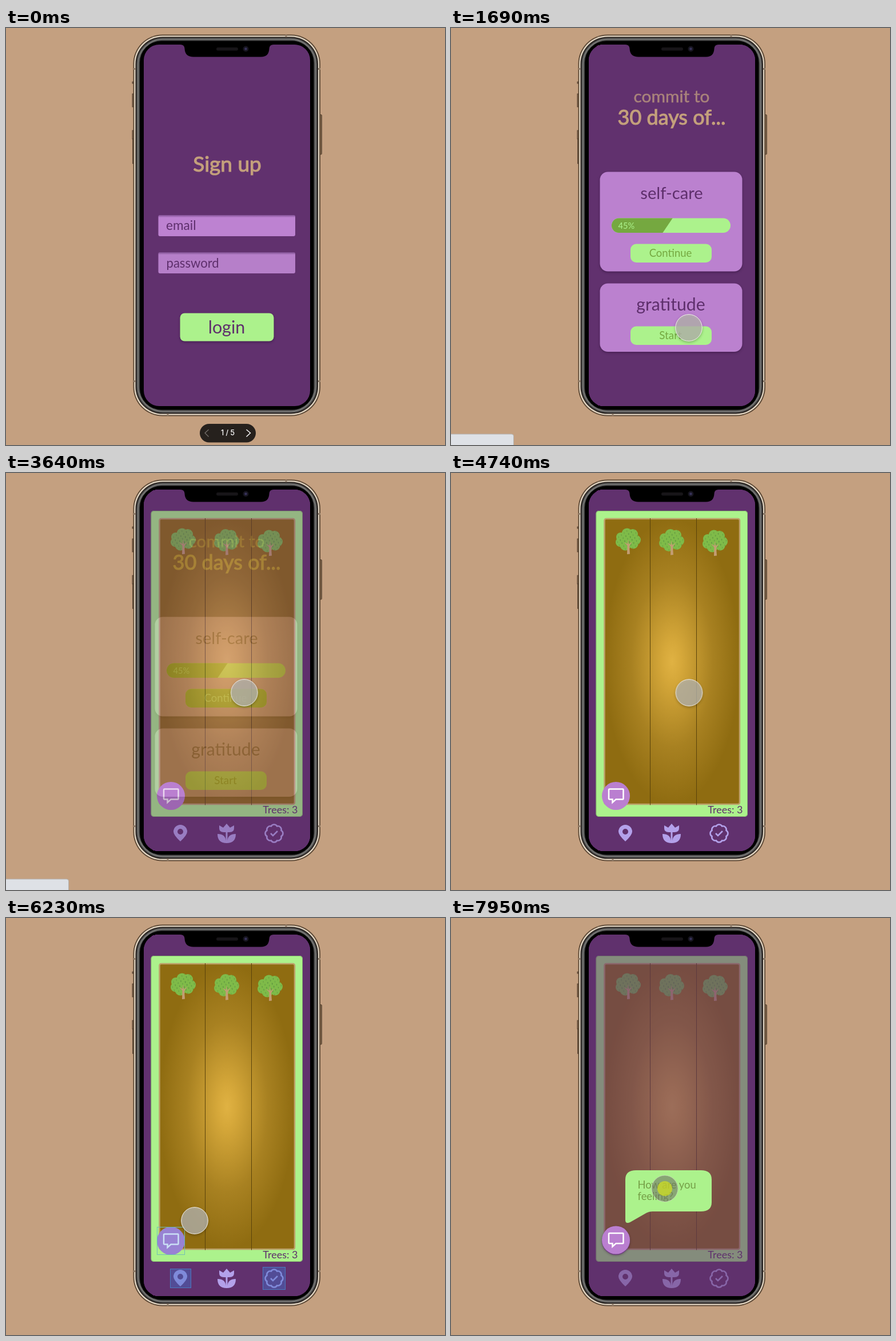
An HTML page for the animation above (8000 ms loop, 768x729 px).

```html
<!DOCTYPE html>
<html lang="en">
<head>
<meta charset="utf-8">
<title>Phone prototype</title>
<style>
  html, body { margin: 0; width: 100%; height: 100%; overflow: hidden; background: #c4a080; }
  svg { display: block; width: 768px; height: 729px; font-family: Lato, "Open Sans", sans-serif; }
  .mid { text-anchor: middle; }
  .end { text-anchor: end; }
  .plum { fill: #5e2f6c; }
  .tan { fill: #c4a07c; }
  .lime { fill: #acf28c; }
  .leaf { fill: #75a840; }
  .card { fill: #bb81cf; }
  .title { stroke: #c4a07c; stroke-width: 1.1; }
  .lift { filter: drop-shadow(0 2px 2px rgba(40, 10, 50, .45)); }
  .hint { fill: rgba(66, 112, 200, .45); stroke: #4a7bc0; }

  /* Every part shares one 8 s clock. */
  .a { animation: 8s linear infinite both; }
  .pill { animation-name: pill; }
  .status { animation-name: status; animation-timing-function: step-end; }
  .login { animation-name: login; }
  .plan { animation-name: plan; }
  .continue { animation-name: continue; }
  .garden { animation-name: garden; }
  .hints { animation-name: hints; }
  .overlay { animation-name: overlay; }
  .cursor { animation-name: move; }
  .idle { animation-name: idle; animation-timing-function: step-end; }
  .press { animation-name: press; animation-timing-function: step-end; }

  @keyframes pill { 0%, 16.25% { opacity: 1 } 18.5%, 100% { opacity: 0 } }
  @keyframes status {
    0% { opacity: 0 } 18% { opacity: 1 } 22.4% { opacity: 0 }
    44.4% { opacity: 1 } 48.6%, 100% { opacity: 0 }
  }
  @keyframes login { 0%, 13.375% { opacity: 0 } 16.25%, 100% { opacity: 1 } }
  @keyframes plan {
    0% { opacity: 0 } 17% { opacity: 0; animation-timing-function: ease-out }
    21%, 100% { opacity: 1 }
  }
  @keyframes continue { 0%, 30.2% { opacity: 0 } 33.6%, 100% { opacity: 1 } }
  @keyframes garden {
    0% { opacity: 0 } 43.5% { opacity: 0; animation-timing-function: ease-out }
    47.5%, 100% { opacity: 1 }
  }
  @keyframes hints { 0%, 73.6% { opacity: 0 } 75.6%, 79.5% { opacity: 1 } 82.6%, 100% { opacity: 0 } }
  @keyframes overlay {
    0% { opacity: 0 } 83.4% { opacity: 0; animation-timing-function: ease-out }
    88%, 100% { opacity: 1 }
  }
  @keyframes idle {
    0% { opacity: 1 } 15.1% { opacity: 0 } 16.25% { opacity: 1 }
    41.6% { opacity: 0 } 42.75% { opacity: 1 } 70.95% { opacity: 0 } 73.25% { opacity: 1 }
    82.5% { opacity: 0 } 83.5% { opacity: 1 } 99.3%, 100% { opacity: 0 }
  }
  @keyframes press {
    0% { opacity: 0 } 15.1% { opacity: 1 } 16.25% { opacity: 0 }
    41.6% { opacity: 1 } 42.75% { opacity: 0 } 70.95% { opacity: 1 } 73.25% { opacity: 0 }
    82.5% { opacity: 1 } 83.5% { opacity: 0 } 99.3%, 100% { opacity: 1 }
  }
  @keyframes move {
    0%, 4.5% { transform: translate(713px, 765px) }
    4.625% { transform: translate(711px, 722px) }
    5.5% { transform: translate(708px, 638px) }
    6.375% { transform: translate(668px, 579px) }
    7.25% { transform: translate(617px, 549px) }
    8.125% { transform: translate(562px, 530px) }
    9% { transform: translate(520px, 525px) }
    9.875% { transform: translate(490px, 524px) }
    10.75% { transform: translate(469px, 524px) }
    12.5% { transform: translate(436px, 524px) }
    14.25% { transform: translate(416px, 524px) }
    25.5% { transform: translate(416px, 524px); animation-timing-function: ease-in-out }
    34.6% { transform: translate(417px, 384px) }
    58.4% { transform: translate(416.5px, 384px) }
    59.25% { transform: translate(416.5px, 384px); animation-timing-function: ease-in-out }
    66.5% { transform: translate(289px, 563px) }
    68.4% { transform: translate(299px, 559px) }
    73.25% { transform: translate(299px, 559px); animation-timing-function: ease-out }
    77.8%, 78.6% { transform: translate(330px, 529px); animation-timing-function: ease-in-out }
    82%, 83.6% { transform: translate(303px, 550px); animation-timing-function: ease-in-out }
    88.4%, 91.4% { transform: translate(338px, 513px) }
    92.4% { transform: translate(341px, 511px) }
    94.4% { transform: translate(341px, 511px); animation-timing-function: ease-in-out }
    98.5%, 100% { transform: translate(374px, 473px) }
  }
</style>
</head>
<body>
<svg viewBox="0 0 768 729">
  <defs>
    <radialGradient id="soil">
      <stop offset="0" stop-color="#e0b243"/>
      <stop offset=".14" stop-color="#d6a83a"/>
      <stop offset=".6" stop-color="#a88121"/>
      <stop offset="1" stop-color="#8f6c11"/>
    </radialGradient>
    <linearGradient id="inset" x2="0" y2="1">
      <stop offset="0" stop-color="#47205a" stop-opacity=".5"/>
      <stop offset=".12" stop-color="#47205a" stop-opacity="0"/>
    </linearGradient>
    <pattern id="leaves" width="8" height="9" patternUnits="userSpaceOnUse" patternTransform="rotate(12)">
      <path d="M2 1l.8 2.6M6 5.500l.7 2.300" stroke="#5c9440" stroke-width=".9"/>
    </pattern>
    <clipPath id="screen"><rect x="241" y="29" width="291" height="632" rx="27"/></clipPath>
    <clipPath id="track"><rect x="281" y="332.500" width="208" height="25.500" rx="12.750"/></clipPath>
    <g id="crown">
      <circle cx="-2" cy="-12" r="9.500"/><circle cx="8" cy="-11" r="9"/><circle cx="13" cy="-1" r="9"/>
      <circle cx="-13" cy="-6" r="8"/><circle cx="-14" cy="3" r="8"/><circle cx="-5" cy="8" r="9.500"/>
      <circle cx="9" cy="6" r="8.500"/><circle r="10"/>
    </g>
    <g id="tree">
      <use href="#crown" fill="#7fbb49"/>
      <use href="#crown" fill="url(#leaves)"/>
      <path d="M-2 24L-1.500 9L-7 3L-1 6L0-2L1 7L7 2L2 10L3 23.500Z" fill="#c39d74"/>
    </g>
    <g id="chat">
      <circle r="24.500" fill="#ba7fd0"/>
      <path d="M-11 -12H12Q13 -12 13 -11V5Q13 6 12 6H0L-6 11.500V6H-11Q-12.500 6 -12.500 4.500V-10.500Q-12.500 -12 -11 -12Z"
            fill="none" stroke="#fff" stroke-width="2.500"/>
    </g>
  </defs>

  <rect width="768" height="729" fill="#c4a080"/>

  <!-- Phone body -->
  <g fill="#7a6046" stroke="#49382a" stroke-width=".8">
    <rect x="221" y="94" width="3" height="3"/>
    <rect x="221" y="115" width="3" height="23"/>
    <rect x="221" y="179" width="3" height="15"/>
    <rect x="221.500" y="194" width="2" height="43"/>
    <rect x="548.500" y="151.500" width="4" height="69.500" rx="1.500"/>
  </g>
  <rect x="222.500" y="11.500" width="327.500" height="667" rx="51" fill="#5a4633"/>
  <rect x="224.200" y="13.200" width="324" height="663.500" rx="49.500" fill="#e2d5c2"/>
  <rect x="226.500" y="15.500" width="319.500" height="659" rx="47.500" fill="#2a2522"/>
  <rect x="228.500" y="17.500" width="315.500" height="655" rx="45.500" fill="#4e4e4e"/>
  <rect x="231" y="19.700" width="310.500" height="650.600" rx="43.500" fill="#4a4a4a" stroke="#7a7a78" stroke-width="1.800"/>
  <rect x="234" y="22.500" width="304.500" height="645" rx="38" fill="#000"/>
  <path d="M223 71.500h4M546 71.500h4M223 617.500h4M546 617.500h4M490 12v4M283 674v4" stroke="#8d7a68" stroke-width="3"/>

  <g clip-path="url(#screen)">
    <!-- Sign up -->
    <rect x="241" y="29" width="291" height="632" fill="#61316e"/>
    <text class="mid tan title" x="387" y="250.500" font-size="37">Sign up</text>
    <rect x="266.500" y="327" width="239.500" height="37" rx="3" fill="#bd82d1"/>
    <rect x="266.500" y="327" width="239.500" height="37" rx="3" fill="url(#inset)"/>
    <rect x="266.500" y="392" width="239.500" height="37" rx="3" fill="#b67fc9"/>
    <rect x="266.500" y="392" width="239.500" height="37" rx="3" fill="url(#inset)"/>
    <text class="plum" x="280" y="353" font-size="22.600">email</text>
    <text class="plum" x="280.500" y="418.500" font-size="22.100">password</text>
    <rect class="lime lift" x="304.500" y="498.500" width="164" height="49" rx="8"/>
    <text class="mid plum" x="386" y="534" font-size="30.500">login</text>
    <g class="a login">
      <rect class="leaf" x="304.500" y="498.500" width="164" height="49" rx="8"/>
      <text class="mid" x="386" y="534" font-size="30.500" fill="#82c44e">login</text>
    </g>

    <!-- Plan list -->
    <g class="a plan">
      <rect x="241" y="29" width="291" height="632" fill="#61316e"/>
      <text class="mid" x="386" y="130" font-size="29.800" fill="#a9837b" stroke="#a9837b" stroke-width=".5">commit to</text>
      <text class="mid tan title" x="386" y="169" font-size="36">30 days of...</text>
      <rect class="card lift" x="260.500" y="251.500" width="249" height="174" rx="14"/>
      <text class="mid plum" x="386" y="299" font-size="29.200">self-care</text>
      <g clip-path="url(#track)">
        <path class="lime" d="M281 332h208v27H281z"/>
        <path class="leaf" d="M281 332H388L370 358.500H281z"/>
      </g>
      <text class="lime" x="292.500" y="350.500" font-size="14.600">45%</text>
      <rect class="lime" x="314" y="377.500" width="142" height="32.500" rx="10"/>
      <text class="mid leaf" x="384" y="400" font-size="18.500">Continue</text>
      <g class="a continue">
        <rect class="leaf" x="314" y="377.500" width="142" height="32.500" rx="10"/>
        <text class="mid lime" x="384" y="400" font-size="18.500">Continue</text>
      </g>
      <rect class="card lift" x="260.500" y="446.500" width="249" height="119.500" rx="14"/>
      <text class="mid plum" x="384.500" y="494" font-size="30.200">gratitude</text>
      <rect class="lime" x="314" y="521.500" width="142" height="32.500" rx="10"/>
      <text class="mid leaf" x="384" y="544" font-size="18.800">Start</text>
    </g>

    <!-- Garden -->
    <g class="a garden">
      <rect x="241" y="29" width="291" height="632" fill="#61316e"/>
      <rect class="lime" x="253.500" y="66" width="265.500" height="535" rx="5"/>
      <rect x="254" y="66.500" width="264.500" height="534" rx="5" fill="none" stroke="#6f9a5e" stroke-opacity=".6"/>
      <rect x="268.500" y="80" width="236.500" height="499" rx="3" fill="url(#soil)" stroke="#bda16a" stroke-width="2.500"/>
      <path d="M348.500 79V580.500M429.500 79V580.500" stroke="#5a430a"/>
      <use href="#tree" x="310" y="118"/>
      <use href="#tree" x="386" y="119.500"/>
      <use href="#tree" x="462" y="121"/>
      <text class="end plum" x="510.500" y="595" font-size="18">Trees: 3</text>
      <g fill="#b3a1ea">
        <path transform="translate(305 627)" fill-rule="evenodd"
              d="M0 17Q-12 6 -12 0A12 12 0 0 1 12 0Q12 6 0 17ZM-5 0A5 5 0 0 0 5 0A5 5 0 0 0-5 0Z"/>
        <path transform="translate(386 630)"
              d="M-13-14L-6-10L0-17L6-10L13-14V-9Q13-2 5-2H1.500V13Q2 1 16 1Q16 17 0 17Q-16 17-16 1Q-2 1-1.500 13V-2H-5Q-13-2-13-9Z"/>
      </g>
      <g transform="translate(469 630)" fill="none" stroke="#b3a1ea" stroke-width="2.600">
        <path d="M12.500-5.200A6 6 0 0 1 12.500 5.200A6 6 0 0 1 5.200 12.500A6 6 0 0 1-5.200 12.500A6 6 0 0 1-12.500 5.200A6 6 0 0 1-12.500-5.200A6 6 0 0 1-5.200-12.500A6 6 0 0 1 5.200-12.500A6 6 0 0 1 12.500-5.200Z"/>
        <path d="M-6 0L-2 4L6-4"/>
      </g>
      <use href="#chat" x="288.500" y="564.500"/>
      <g class="a hints">
        <rect class="hint" x="287.500" y="613.500" width="36" height="33"/>
        <rect class="hint" x="449.500" y="610.500" width="39" height="39"/>
        <rect class="hint" x="264.500" y="540.500" width="48" height="48" style="fill: none; stroke: #74bfb4"/>
        <circle cx="288.500" cy="564.500" r="24.500" fill="rgba(66, 142, 220, .28)"/>
      </g>
    </g>

    <!-- Question -->
    <g class="a overlay">
      <rect x="241" y="29" width="291" height="632" fill="#61316e" opacity=".53"/>
      <path class="lime" d="M324 441H437Q456 441 456 457V497Q456 513 437 513H352Q346 513 342 515.500L314 531.500Q305 536 305 528V457Q305 441 324 441Z"/>
      <text font-size="18.400" fill="#759f47"><tspan x="326.500" y="473">How are you</tspan><tspan x="326.500" y="493">feeling?</tspan></text>
      <use class="lift" href="#chat" x="288.500" y="563"/>
    </g>
  </g>

  <!-- Notch -->
  <path d="M305 28V29Q312 29 312.500 36Q313 50.500 328 50.500H446Q460 50.500 460.500 36Q461 29 468 29V28Z" fill="#000"/>
  <rect x="368" y="34" width="38" height="5.500" rx="2.700" fill="#171518"/>
  <circle cx="419.500" cy="36.500" r="5" fill="#17151f"/>
  <circle cx="419.500" cy="36.500" r="2.300" fill="#37325a"/>

  <!-- Viewer chrome -->
  <g class="a pill">
    <rect x="339" y="692" width="98" height="32.500" rx="16.250" fill="#26211d"/>
    <text class="mid" x="388" y="712" font-size="12.500" font-weight="500" fill="#fff" style="font-family: Inter, sans-serif">1 / 5</text>
    <path d="M354.500 702L348 708L354.500 714.500" fill="none" stroke="#77726e" stroke-width="1.200"/>
    <path d="M420.500 702L427.500 708L420.500 714.500" fill="none" stroke="#fff" stroke-width="1.400"/>
  </g>
  <path class="a status" d="M-1 710H106Q109.500 710 109.500 713.500V730H-1Z" fill="#dee1e6" stroke="#b5b4b4"/>

  <g class="a cursor">
    <g class="a idle">
      <circle r="23.300" fill="rgba(185, 184, 178, .77)" stroke="#f1eeea"
              style="filter: drop-shadow(0 2px 2px rgba(0, 0, 0, .3))"/>
    </g>
    <g class="a press">
      <circle r="23" fill="rgba(112, 114, 100, .6)" stroke="rgba(215, 215, 205, .6)"/>
      <circle r="13" fill="rgba(216, 231, 20, .65)"/>
    </g>
  </g>
</svg>
</body>
</html>
```
